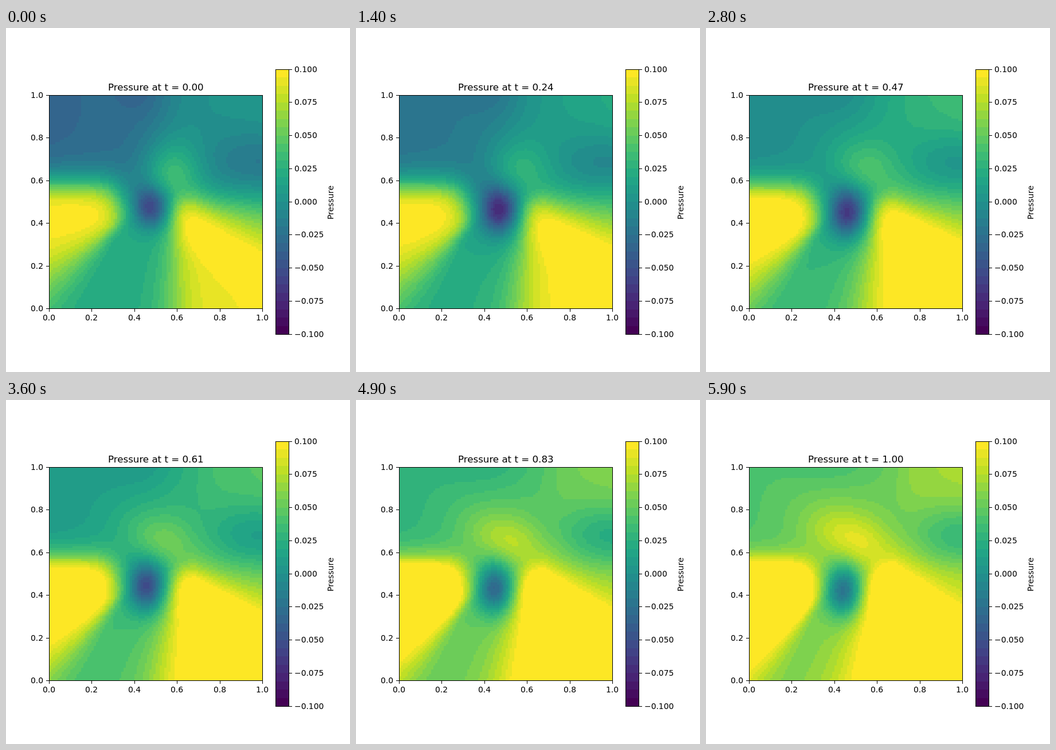
Write an HTML page with a canvas that moves like this. It is 600 px wide and 600 px high and loops after 6000 ms.

```html
<!DOCTYPE html>
<html lang="en">
<head>
<meta charset="utf-8">
<title>Pressure</title>
<style>
  html, body { margin: 0; width: 100%; height: 100%; overflow: hidden; background: #fff; }
  canvas { display: block; }
</style>
</head>
<body>
<canvas id="stage" width="600" height="600"></canvas>
<script>
const ctx = document.getElementById('stage').getContext('2d');
const N = 100, LEFT = 75, TOP = 117, SIZE = 372, LEVELS = 32, FRAMES = 60;
const BAR = { x: 470, y: 72, w: 23, h: 462 };

// Viridis in 32 steps
const stops = '440154 482475 414487 355f8d 2a788e 21918c 22a884 44bf70 7ad151 bddf26 fde725'
  .split(' ').map(s => [0, 2, 4].map(i => parseInt(s.slice(i, i + 2), 16)));
const colors = Array.from({ length: LEVELS }, (_, k) => {
  const u = k / (LEVELS - 1) * 10, i = Math.min(9, Math.floor(u));
  return `rgb(${stops[i].map((c, j) => Math.round(mix(c, stops[i + 1][j], u - i)))})`;
});

function mix(a, b, f) { return a + (b - a) * f; }
const ramp = (d, width) => 1 / (1 + Math.exp(-d / width));
const bell = (dx, dy, sx, sy = sx) => Math.exp(-((dx / sx) ** 2 + (dy / sy) ** 2) / 2);

// Pressure in thousandths at a point of the unit square, for t from 0 to 1
function pressure(x, y, t) {
  // Calm regions above and below, with a valley on the right and a notch at the top
  const upper = mix(-34 + 18 * x + 21 * ramp(x - 0.55, 0.05), 42 + 20 * x + 10 * ramp(x - 0.72, 0.03), t)
    - (28 + 14 * t) * bell(x - 1.02, y - 0.67, 0.2, 0.11)
    - 10 * bell(x - 0.43, y - 1.02, 0.08 + 0.1 * t, 0.08);
  let v = mix(21 + 37 * t, upper, ramp(y - 0.52 + 0.07 * x, 0.035));

  // Swelling above the vortex, drifting left and widening
  const bx = x - 0.57 + 0.07 * t, by = y - 0.62 - 0.035 * t;
  v += (48 - 8 * t) * bell(bx, by + 0.3 * t * bx, 0.1 + 0.06 * t, 0.12 - 0.02 * t);

  // High pressure on the left: top edge, slanted bottom edge, tip
  const leftMask = ramp(0.58 - 0.03 * t - y, 0.047 - 0.01 * t)
    * ramp(y - 0.155 + 0.065 * t - (0.7 + 0.15 * t) * x, Math.max(0.02, 0.11 - 0.3 * x))
    * ramp(0.327 - 0.03 * t - x, 0.04);
  v = mix(v, 110 + 45 * t, leftMask);

  // High pressure on the right: left edge, falling top edge, ridge just below it
  const side = mix(0.575 + 0.03 * y, 0.49 + 0.2 * y, t);
  const sideWidth = Math.max(0.025, mix(0.055 - 0.06 * y, 0.085 - 0.11 * y, t));
  const roof = 0.49 - (0.3 + 0.34 * t) * (Math.max(x, 0.68) - 0.75);
  const roofWidth = Math.max(0.03, 0.045 + 0.14 * (x - 0.75));
  const ridge = 18 * bell(y - 0.37 + 0.57 * (x - 0.67), 0, 0.08);
  v = mix(v, 92 + 10 * (x - 0.7) + ridge + 47 * t, ramp(x - side, sideWidth) * ramp(roof - y, roofWidth));

  // Vortex core, and a passing sag that is strongest early on
  v -= (75 + 8 * t) * bell(x - 0.481 + 0.038 * t, y - 0.468 + 0.045 * t, 0.06, 0.068 + 0.017 * t);
  const sag = 7.2 * t * (1 - t) ** 2;
  return v - sag * (8 * (1 - x * x) + 25 * bell(x - 0.49, y - 0.5, 0.15));
}

const edge = k => Math.round(k * SIZE / N);

function drawField(t) {
  for (let j = 0; j < N; j++) for (let i = 0; i < N; i++) {
    const v = pressure((i + 0.5) / N, 1 - (j + 0.5) / N, t);
    const k = Math.floor((v + 100) / 200 * LEVELS);
    ctx.fillStyle = colors[Math.min(LEVELS - 1, Math.max(0, k))];
    const x = edge(i), y = edge(j);
    ctx.fillRect(LEFT + x, TOP + y, edge(i + 1) - x, edge(j + 1) - y);
  }
}

function text(s, x, y, size = 13.89) {
  ctx.font = `${size}px "DejaVu Sans", sans-serif`;
  ctx.fillStyle = '#000';
  ctx.fillText(s, x, y);
}

function drawAxes() {
  ctx.strokeStyle = '#000';
  ctx.lineWidth = 1;
  ctx.strokeRect(LEFT + 0.5, TOP + 0.5, SIZE, SIZE);
  for (let k = 0; k <= 5; k++) {
    const d = Math.round(k * SIZE / 5), label = (k / 5).toFixed(1);
    ctx.fillStyle = '#000';
    ctx.fillRect(LEFT + d, TOP + SIZE + 1, 1, 5);
    ctx.fillRect(LEFT - 5, TOP + SIZE - d, 5, 1);
    text(label, LEFT + d - 11, 510);
    text(label, 43, TOP + SIZE - d + 5);
  }
}

function drawBar() {
  const { x, y, w, h } = BAR;
  const top = k => Math.round(h * (LEVELS - k) / LEVELS);
  colors.forEach((color, k) => {
    ctx.fillStyle = color;
    ctx.fillRect(x, y + top(k + 1), w, top(k) - top(k + 1));
  });
  ctx.strokeRect(x + 0.5, y + 0.5, w, h);
  for (let k = 0; k <= 8; k++) {
    const tickY = Math.floor(y + h * k / 8), value = Math.abs(0.1 - k * 0.025).toFixed(3);
    ctx.fillStyle = '#000';
    ctx.fillRect(x + w + 1, tickY, 5, 1);
    text((k > 4 ? '\u2212' : '') + value, 503, tickY + 5);
  }
  ctx.save();
  ctx.translate(571, 334);
  ctx.rotate(-Math.PI / 2);
  text('Pressure', 0, 0);
  ctx.restore();
}

let shown = -1;
function tick(now) {
  const step = Math.floor(now / 100) % FRAMES;
  if (step !== shown) {
    shown = step;
    const t = step / (FRAMES - 1);
    ctx.fillStyle = '#fff';
    ctx.fillRect(0, 0, 600, 600);
    drawField(t);
    drawAxes();
    drawBar();
    text(`Pressure at t = ${t.toFixed(2)}`, 178, 109, 16.67);
  }
  requestAnimationFrame(tick);
}
tick(0);
</script>
</body>
</html>
```
